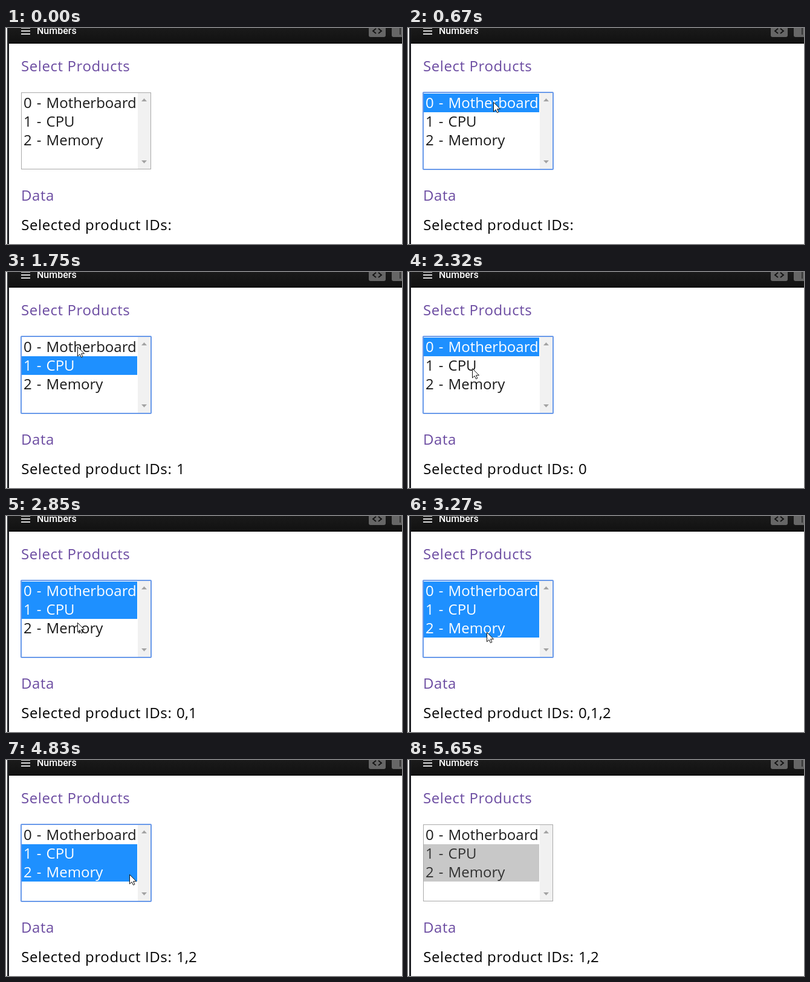
Write an HTML page with a canvas that moves like this. It is 655 px wide and 359 px high and loops after 6.15 s.

```html
<!DOCTYPE html>
<html lang="en">
<head>
<meta charset="utf-8">
<title>Multiple select</title>
<style>
  html, body { margin: 0; width: 100%; height: 100%; overflow: hidden; background: #fff; }
  canvas { display: block; }
</style>
</head>
<body>
<canvas id="stage" width="655" height="359"></canvas>
<script>
const ctx = document.getElementById('stage').getContext('2d');
const LOOP = 6150, TICK = 70;
const BODY = '24px "Open Sans", "Noto Sans", sans-serif';
const TITLE = '500 16px Roboto, sans-serif';
const PURPLE = '#6b4ba1';
const ROW_H = 31;
const ROWS = ['0 - Motherboard', '1 - CPU', '2 - Memory'];

// Pointer moves, each starting where the last one ended
const ENTRY = { x: 556, y: 0 };
const MOVES = [
  { start: 160, end: 650, x: 141, y: 123 },
  { start: 880, end: 1160, x: 121, y: 156 },
  { start: 1540, end: 1750, x: 118, y: 124 },
  { start: 1960, end: 2320, x: 106, y: 160 },
  { start: 2780, end: 3060, x: 130, y: 193 },
  { start: 3630, end: 4050, x: 108, y: 158 },
  { start: 4310, end: 4800, x: 204, y: 190 },
  { start: 4900, end: 4970, x: 387, y: 180 },
  { start: 4970, end: 5490, x: 619, y: 0 }
];
const EXIT = 5560, FOCUS = 650, BLUR = 5650;

// Rows change on press, the printed IDs follow on release; the last two are one drag
const PRESSES = [
  { down: 650, up: 760, rows: [0] },
  { down: 1200, up: 1320, rows: [1] },
  { down: 1820, up: 1960, rows: [0] },
  { down: 2410, up: 2500, rows: [0, 1] },
  { down: 3200, up: 3270, rows: [0, 1, 2] },
  { down: 4120, up: 4660, rows: [1] },
  { down: 4520, up: 4660, rows: [1, 2] }
];

const rowsAt = (t, phase) => PRESSES.filter(p => p[phase] <= t).pop()?.rows ?? [];
const smooth = u => u * u * (3 - 2 * u);

// Each move advances in ticks, as in a screen recording
function pointerAt(t) {
  let { x, y } = ENTRY;
  for (const m of MOVES) {
    if (t < m.start) break;
    const done = (Math.floor((t - m.start) / TICK) + 1) * TICK;
    const e = smooth(Math.min(1, done / (m.end - m.start)));
    x += (m.x - x) * e;
    y += (m.y - y) * e;
  }
  return [Math.round(x), Math.round(y)];
}

function rect(x, y, w, h, color) {
  ctx.fillStyle = color;
  ctx.fillRect(x, y, w, h);
}

function roundRect(x, y, w, h, r, color) {
  ctx.fillStyle = color;
  ctx.beginPath();
  ctx.roundRect(x, y, w, h, r);
  ctx.fill();
}

function trace(points) {
  ctx.beginPath();
  points.forEach(([x, y]) => ctx.lineTo(x, y));
}

function text(str, x, y, color, { font = BODY, letter = 0, word = 0 } = {}) {
  ctx.font = font;
  ctx.letterSpacing = letter + 'px';
  ctx.wordSpacing = word + 'px';
  ctx.fillStyle = color;
  ctx.fillText(str, x, y);
}

function chevron(x, y, dir) {
  trace([[x - dir * 5, y - 4], [x, y], [x - dir * 5, y + 4]]);
  ctx.strokeStyle = '#111';
  ctx.lineWidth = 1.8;
  ctx.stroke();
}

function arrow(base, dir) {
  trace([[224, base], [228.5, base + dir * 5], [233, base]]);
  ctx.fillStyle = '#a3a3a3';
  ctx.fill();
}

function drawFrame() {
  rect(0, 0, 655, 359, '#fff');
  rect(2, 0, 3, 359, '#1d1e22');
  const bar = ctx.createLinearGradient(0, 0, 0, 26);
  bar.addColorStop(0, '#1a1a1a');
  bar.addColorStop(1, '#111');
  rect(5, 0, 650, 26, bar);
  rect(5, 25, 650, 1, '#000');
  for (let y = -1; y < 10; y += 5) rect(25, y, 15, 2, '#ddd');
  text('Numbers', 51, 10, '#fff', { font: TITLE });
  for (const x of [600, 638]) roundRect(x, -6, 28, 21, 3, '#666');
  chevron(607, 5, -1);
  chevron(621, 5, 1);
  rect(651, 0, 2, 11, '#333');
}

function drawSelect(t) {
  const focused = t >= FOCUS && t < BLUR;
  const selected = rowsAt(t, 'down');
  if (focused) roundRect(24, 106, 217, 130, 2, '#6899ea');
  else rect(25, 107, 215, 128, '#a9a9a9');
  rect(26, 108, 213, 126, '#fff');
  rect(218, 108, 21, 126, '#f1f1f1');
  arrow(122, -1);
  arrow(220, 1);
  ROWS.forEach((label, i) => {
    const y = 109 + i * ROW_H;
    const on = selected.includes(i);
    if (on) rect(26, y, 191, ROW_H, focused ? '#1e90ff' : '#c8c8c8');
    const color = !on ? '#1a1a1a' : focused ? '#fff' : '#323232';
    text(label, 29, y + 24, color, { word: 1.8 });
  });
}

function drawPointer(x, y) {
  ctx.save();
  ctx.translate(x + 0.5, y + 0.5);
  trace([[0, 0], [0, 15.5], [3.6, 12.2], [6, 17.3], [8.4, 16.2], [6.1, 11.2], [11, 11.2]]);
  ctx.closePath();
  ctx.fillStyle = '#fff';
  ctx.strokeStyle = '#111';
  ctx.lineWidth = 1;
  ctx.fill();
  ctx.stroke();
  ctx.restore();
}

function draw(t) {
  drawFrame();
  text('Select Products', 25, 72, PURPLE, { letter: 0.6 });
  drawSelect(t);
  text('Data', 25, 287, PURPLE, { letter: 0.6 });
  text('Selected product IDs:', 25.2, 336, '#000', { letter: 0.6 });
  text(rowsAt(t, 'up').join(), 282, 336, '#000', { letter: 0.2 });
  if (t >= MOVES[0].start && t < EXIT) drawPointer(...pointerAt(t));
}

const begin = performance.now();
function loop() {
  draw((performance.now() - begin) % LOOP);
  requestAnimationFrame(loop);
}
loop();
</script>
</body>
</html>
```
